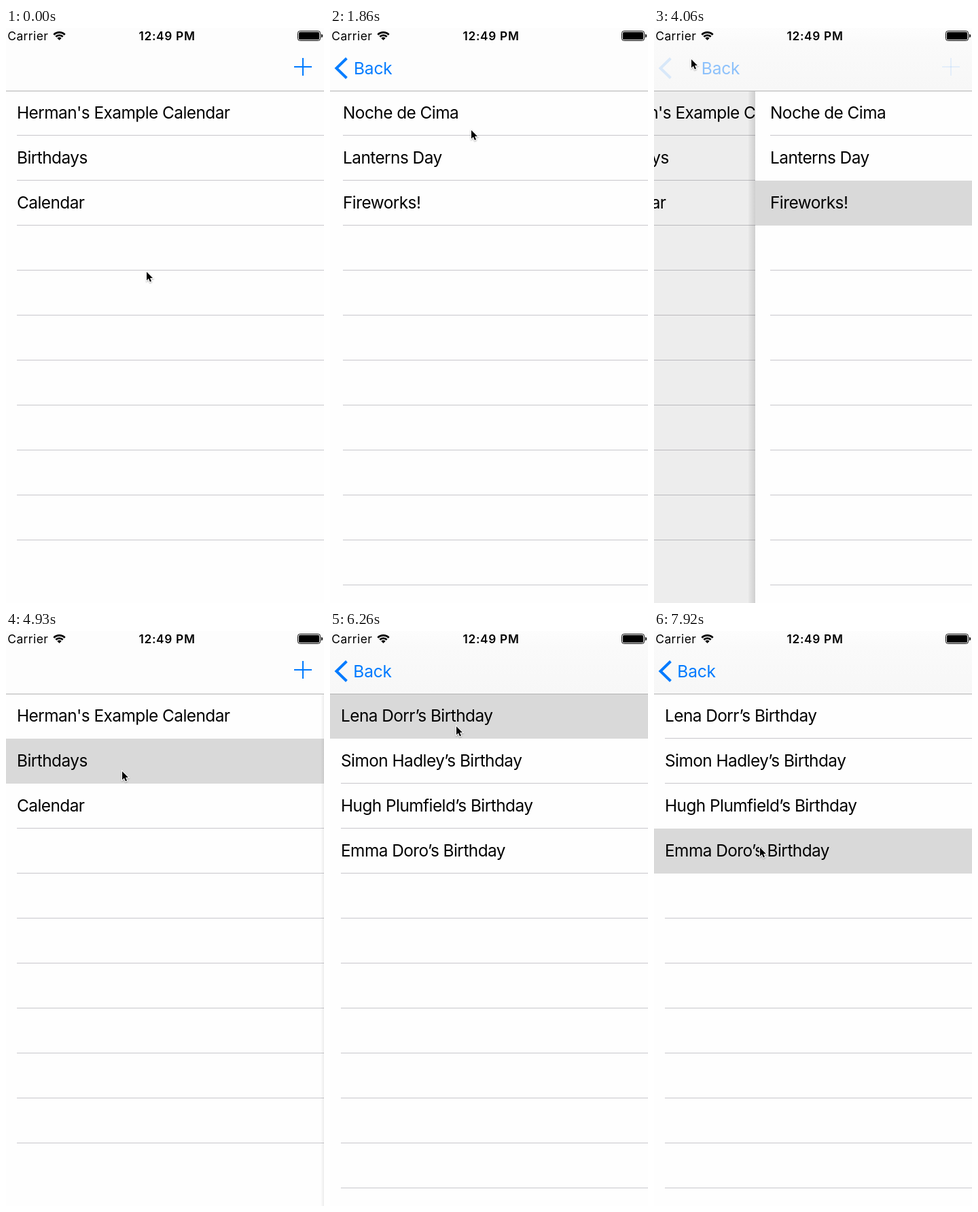
Recreate the animation shown at these times as an HTML page with a canvas. Size 468 by 844 pixels, loop 8000 ms.

```html
<!DOCTYPE html>
<html lang="en">
<head>
<meta charset="utf-8">
<title>Calendar list</title>
<style>
html, body { margin: 0; width: 100%; height: 100%; overflow: hidden; background: #fefefe; }
canvas { display: block; width: 468px; height: 844px; }
</style>
</head>
<body>
<canvas id="stage"></canvas>
<script>
const W = 468, H = 844, LOOP = 8000;
const ROW = 66, TOP = 92, SCREEN = 480, CROP = 6;
const BLUE = '#007aff', PAPER = '#fefefe';
const canvas = document.getElementById('stage');
const ratio = window.devicePixelRatio || 1;
canvas.width = W * ratio;
canvas.height = H * ratio;
const ctx = canvas.getContext('2d');

const calendars = { lines: 10, items: ["Herman's Example Calendar", 'Birthdays', 'Calendar'] };
const holidays = { lines: 11, items: ['Noche de Cima', 'Lanterns Day', 'Fireworks!'] };
const birthdays = {
  lines: 11,
  items: ['Lena Dorr', 'Simon Hadley', 'Hugh Plumfield', 'Emma Doro'].map(n => n + '’s Birthday')
};

// [time, selected row]
const calendarPicks = [[0, -1], [1150, 0], [3370, -1], [4930, 1]];
const eventPicks = [[0, -1], [2120, 0], [2480, 1], [2830, 2], [4700, -1],
  [6260, 0], [6650, 1], [7040, 2], [7470, 3]];

// [start, end, x, y, sideways bow]
const cursorStart = [207, 358];
const cursorMoves = [
  [230, 710, 208, 142, 28],
  [1500, 1860, 208, 150, 0],
  [2180, 2420, 195, 205, 0],
  [2520, 2740, 187, 243, 0],
  [3330, 3800, 55, 46, 0],
  [4190, 4660, 171, 206, 0],
  [5300, 5720, 186, 140, 0],
  [6320, 6590, 182, 200, 0],
  [6700, 6980, 174, 258, 0],
  [7090, 7440, 155, 320, 0],
  [7919, 7920, 156, 318, 0]
];

const clamp = v => Math.max(0, Math.min(1, v));
const ease = v => v * v * (3 - 2 * v);

// critically damped slide
function slide(t, start) {
  const s = (t - start) / 100;
  if (s <= 0) return 0;
  return s > 7.15 ? 1 : 1 - Math.exp(-s) * (1 + s);
}

// how far the event list covers the calendar list
const coverage = t =>
  t < 3900 ? slide(t, 1150) : t < 4900 ? 1 - slide(t, 3945) : slide(t, 4930);

function pickAt(picks, t) {
  let row = -1;
  for (const [time, value] of picks) if (t >= time) row = value;
  return row;
}

function cursorAt(t) {
  let [x, y] = cursorStart;
  for (const [a, b, toX, toY, bow] of cursorMoves) {
    if (t < a) break;
    const p = ease(clamp((t - a) / (b - a)));
    x += (toX - x) * p + bow * Math.sin(Math.PI * p);
    y += (toY - y) * p;
  }
  return [x, y];
}

function rect(x, y, w, h, color) {
  ctx.fillStyle = color;
  ctx.fillRect(x, y, w, h);
}

function text(str, x, y, size, spacing, color = '#000', weight = 400) {
  ctx.font = `${weight} ${size}px Inter, Roboto, sans-serif`;
  ctx.letterSpacing = spacing + 'px';
  ctx.fillStyle = color;
  ctx.fillText(str, x, y);
}

function line(points, width, color) {
  ctx.beginPath();
  points.forEach(([x, y]) => ctx.lineTo(x, y));
  ctx.lineWidth = width;
  ctx.strokeStyle = color;
  ctx.stroke();
}

function pill(x, y, w, h, r) {
  ctx.beginPath();
  ctx.roundRect(x, y, w, h, r);
}

function drawList({ lines, items }, offset, picked) {
  ctx.save();
  ctx.translate(Math.round(offset), 0);
  rect(-CROP, TOP, SCREEN, H - TOP, PAPER);
  for (let i = 0; i < lines; i++) {
    if (picked < 0 || (i !== picked && i !== picked - 1)) {
      rect(16, TOP + ROW * (i + 1) - 1, W, 1, '#c8c7cc');
    }
  }
  if (picked >= 0) rect(-CROP, TOP + ROW * picked, SCREEN, ROW, '#d9d9d9');
  items.forEach((item, i) => text(item, 16, 133 + ROW * i, 24.4, -0.55));
  ctx.restore();
}

function drawShadow(edge) {
  const g = ctx.createLinearGradient(edge - 10, 0, edge, 0);
  g.addColorStop(0, 'rgba(0,0,0,0.02)');
  g.addColorStop(1, 'rgba(0,0,0,0.13)');
  rect(edge - 10, TOP, 10, H - TOP, g);
}

function drawNav(t, cover) {
  const gray = (t >= 2120 && t < 4230) || t >= 5720;
  const g = ctx.createLinearGradient(0, 0, 0, TOP);
  g.addColorStop(0, '#fdfdfd');
  g.addColorStop(0.25, gray ? '#fafafa' : '#fdfdfd');
  g.addColorStop(1, gray ? '#f7f7f7' : '#fdfdfd');
  rect(0, 0, W, TOP, g);
  rect(0, TOP, W, 1, '#b2b2b2');

  const out = 1 - cover;
  ctx.globalAlpha = clamp(1 - 2.7 * out);
  line([[24.5, 44.5], [9.5, 59], [24.5, 73.5]], 4, BLUE);
  ctx.globalAlpha = clamp(1 - 1.75 * out);
  text('Back', 34.3 + 110 * out, 68, 24.5, -0.2, BLUE);
  ctx.globalAlpha = clamp((out - 0.27) / 0.6);
  rect(424, 56, 26, 2, BLUE);
  rect(436, 44, 2, 26, BLUE);
  ctx.globalAlpha = 1;
}

function drawStatus() {
  text('Carrier', 2.2, 18, 17.5, 0.4);
  ctx.textAlign = 'center';
  text('12:49 PM', 237, 18, 17.3, 0.7, '#000', 600);
  ctx.textAlign = 'left';

  const sweep = [-Math.PI * 0.75, -Math.PI * 0.25];
  ctx.strokeStyle = ctx.fillStyle = '#000';
  ctx.lineWidth = 2.6;
  for (const r of [11.6, 7.4]) {
    ctx.beginPath();
    ctx.arc(78.5, 18, r, ...sweep);
    ctx.stroke();
  }
  ctx.beginPath();
  ctx.moveTo(78.5, 18);
  ctx.arc(78.5, 18, 4.4, ...sweep);
  ctx.fill();

  pill(429.5, 4.5, 33, 14, 3);
  ctx.lineWidth = 1;
  ctx.stroke();
  pill(431, 6, 30, 11, 1.5);
  ctx.fill();
  pill(464, 9, 2, 5, [0, 2, 2, 0]);
  ctx.fill();
}

function drawCursor([x, y]) {
  ctx.save();
  ctx.translate(Math.round(x), Math.round(y));
  ctx.beginPath();
  [[0, 0], [0, 12.5], [2.9, 9.8], [4.9, 14.6], [7, 13.7], [5, 9], [9, 9]]
    .forEach(([px, py]) => ctx.lineTo(px, py));
  ctx.closePath();
  ctx.shadowColor = 'rgba(0,0,0,0.3)';
  ctx.shadowBlur = 2 * ratio;
  ctx.shadowOffsetY = ratio;
  ctx.lineWidth = 2;
  ctx.strokeStyle = '#fff';
  ctx.stroke();
  ctx.shadowColor = 'transparent';
  ctx.fillStyle = '#000';
  ctx.fill();
  ctx.restore();
}

function draw(t) {
  const cover = coverage(t);
  const offset = SCREEN * (1 - cover);
  ctx.setTransform(ratio, 0, 0, ratio, 0, 0);
  rect(0, 0, W, H, PAPER);
  if (cover < 1) {
    drawList(calendars, -0.3 * SCREEN * cover, pickAt(calendarPicks, t));
    rect(0, TOP, W, H - TOP, `rgba(0,0,0,${0.1 * cover})`);
  }
  const moving = (t >= 1150 && t < 4660) || t >= 4930;
  if (moving) {
    if (cover < 1) drawShadow(Math.round(offset) - CROP);
    drawList(t < 4800 ? holidays : birthdays, offset, pickAt(eventPicks, t));
  }
  drawNav(t, cover);
  drawStatus();
  drawCursor(cursorAt(t));
}

const began = performance.now();
function tick() {
  draw((performance.now() - began) % LOOP);
  requestAnimationFrame(tick);
}
tick();
</script>
</body>
</html>
```
